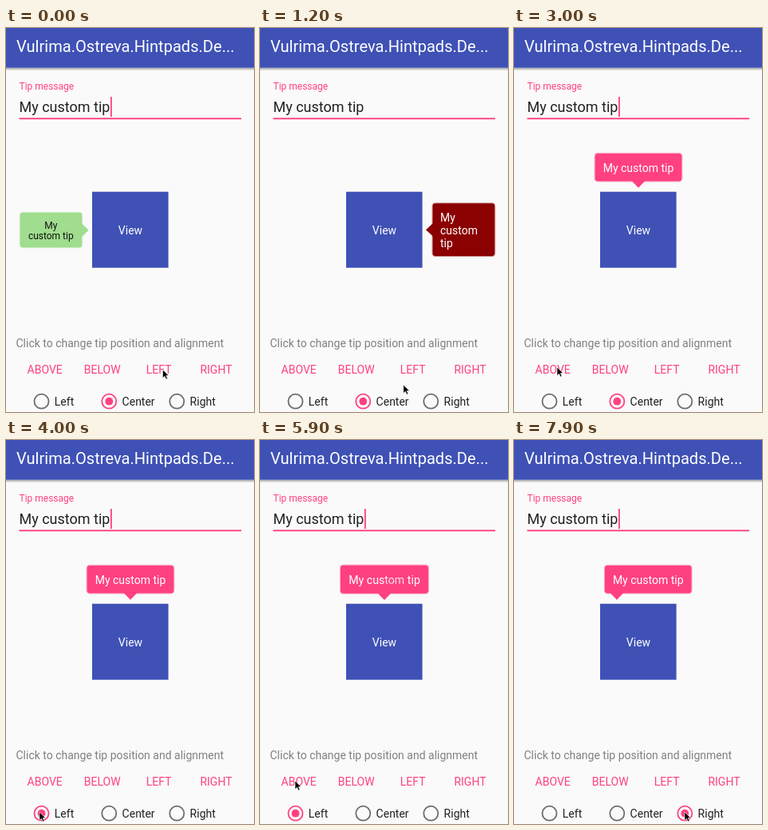
An HTML page for the animation above (8 s loop, 311 by 480 pixels).

```html
<!DOCTYPE html>
<html lang="en">
<head>
<meta charset="utf-8">
<title>Tooltip demo</title>
<style>
  html, body { margin: 0; width: 100%; height: 100%; overflow: hidden; background: #fafafa; }
  svg { display: block; width: 311px; height: 480px; font: 14px Roboto, "Noto Sans", sans-serif; }
  .pink { fill: #ff4081; }
  .blue { fill: #3f51b5; }
  .white { fill: #fff; }
  .ink { fill: #212121; }
  .mid { text-anchor: middle; }
</style>
</head>
<body>
<svg id="stage" viewBox="0 0 311 480">
  <linearGradient id="shade" x2="0" y2="1">
    <stop offset="0" stop-opacity=".36"/>
    <stop offset="1" stop-opacity="0"/>
  </linearGradient>
  <rect width="311" height="480" fill="#fafafa"/>
  <rect y="49.6" width="311" height="4" fill="url(#shade)"/>
  <rect class="blue" width="311" height="49.7"/>
  <text class="white" x="13" y="30" font-size="20.1">Vulrima.Ostreva.Hintpads.De...</text>

  <text class="pink" x="16.5" y="77" font-size="12">Tip message</text>
  <text class="ink" x="16.5" y="105" font-size="18">My custom tip</text>
  <rect class="pink" x="16.5" y="112.3" width="278.5" height="1.9"/>
  <rect id="caret" class="pink" x="131" y="86" width="1.8" height="25"/>

  <rect class="blue" x="108" y="204.7" width="95.6" height="95"/>
  <text class="white mid" x="156" y="257.5">View</text>

  <text x="12.5" y="399" fill="#808080">Click to change tip position and alignment</text>
  <g id="buttons" class="pink mid"></g>
  <g id="radios"></g>
  <g id="tips"></g>
  <path id="pointer" d="M0 0V10.4L2.5 8.2L4.2 12L6 11.2L4.3 7.5H7.5Z"
        fill="#000" stroke="#fff" stroke-width=".7" stroke-opacity=".8"/>
</svg>
<script>
const LOOP = 8000, STEP = 100, POP = 400, EDGE = 1.1;
const $ = id => document.getElementById(id);

function add(parent, tag, attrs, text) {
  const el = document.createElementNS("http://www.w3.org/2000/svg", tag);
  for (const k in attrs) el.setAttribute(k, attrs[k]);
  if (text) el.textContent = text;
  parent.appendChild(el);
  return el;
}

[["ABOVE", 48.7], ["BELOW", 120.7], ["LEFT", 191.7], ["RIGHT", 263.5]]
  .forEach(([label, x]) => add($("buttons"), "text", { x, y: 432 }, label));

// Radio buttons, selected during [from, to)
const radios = [
  { label: "Left", x: 44.5, from: 4000, to: 7900 },
  { label: "Center", x: 129.3, from: 0, to: 4000 },
  { label: "Right", x: 214.3, from: 7900, to: LOOP }
];
for (const r of radios) {
  const at = { cx: r.x, cy: 466.7 };
  r.ring = add($("radios"), "circle", { ...at, r: 9, fill: "none", "stroke-width": 1.8 });
  r.dot = add($("radios"), "circle", { ...at, r: 4.9, class: "pink" });
  add($("radios"), "text", { x: r.x + 16.3, y: 472, class: "ink" }, r.label);
}

// Tips: body box, arrow points, pivot, text lines, life span
const above = { color: "#ff4081", ink: "#fff", size: 14, y: 155.8, h: 36.8, w: 110.8 };
const tips = [
  { color: "#a0dd8e", ink: "#111", size: 12, x: 16.6, y: 229.7, w: 79.6, h: 45.6,
    arrow: "95,244.5 103.7,252.7 95,261", pivot: [60.3, 252.5],
    lines: [["My", 56.3, 250.5], ["custom tip", 56.3, 264.3]], show: -LOOP, hide: 633 },
  { color: "#8b0000", ink: "#fff", size: 14, x: 215.5, y: 218.2, w: 79.8, h: 67.8,
    arrow: "217,244 208,252.2 217,260.5", pivot: [251.5, 252],
    lines: [["My", 226, 241.7], ["custom", 226, 257.7], ["tip", 226, 273.7]],
    left: true, show: 633, hide: 2385 },
  { ...above, x: 100.6, arrow: "147.5,191 156,199.7 164.5,191", pivot: [156, 177.8],
    lines: [["My custom tip", 156, 179.5]], show: 2385, hide: 5880 },
  { ...above, x: 112.8, arrow: "120.5,191 129,199.7 137.5,191", pivot: [168.2, 177.8],
    lines: [["My custom tip", 168.2, 179.5]], show: 5880, hide: 2 * LOOP }
];
for (const t of tips) {
  t.el = add($("tips"), "g", {});
  // The translucent stroke gives the body a soft edge
  add(t.el, "rect", { x: t.x + EDGE, y: t.y + EDGE, width: t.w - 2 * EDGE,
    height: t.h - 2 * EDGE, rx: 3.4, fill: t.color, stroke: t.color,
    "stroke-opacity": .4, "stroke-width": 2 * EDGE });
  add(t.el, "polygon", { points: t.arrow, fill: t.color });
  for (const [s, x, y] of t.lines)
    add(t.el, "text", { x, y, fill: t.ink, "font-size": t.size,
      "text-anchor": t.left ? "start" : "middle" }, s);
}

const clamp = v => Math.max(0, Math.min(1, v));

function overshoot(p) {
  const q = p - 1;
  return q * q * (3 * q + 2) + 1;
}

function anticipateOvershoot(p) {
  const u = 2 * p, v = u - 2;
  return p < .5 ? .5 * u * u * (4 * u - 3) : .5 * (v * v * (4 * v + 3) + 2);
}

function tipScale(t, now) {
  if (now < t.show) return 0;
  if (now >= t.hide) return 1 - anticipateOvershoot(clamp((now - t.hide) / POP));
  return overshoot(clamp((now - t.show) / POP));
}

// Pointer stops: time, x, y
const path = [
  [0, 196.5, 427], [300, 222, 433], [650, 260, 425], [900, 260, 425],
  [1300, 165, 450], [1800, 25, 457], [2100, 25, 457], [2380, 46, 426],
  [2500, 46, 426], [2950, 54, 424], [3100, 54, 424], [3750, 42, 465],
  [4300, 42, 465], [5200, 37, 465], [5450, 18, 453], [5800, 44, 426],
  [6950, 44, 426], [7700, 214, 465], [LOOP, 214, 465]
];

function pointerAt(now) {
  const i = path.findIndex(p => p[0] > now);
  const a = path[i - 1], b = path[i];
  const p = (now - a[0]) / (b[0] - a[0]), e = p * p * (3 - 2 * p);
  return [a[1] + (b[1] - a[1]) * e, a[2] + (b[2] - a[2]) * e];
}

function draw(now) {
  const blink = now % 1000;
  $("caret").setAttribute("visibility", blink >= 150 && blink < 650 ? "hidden" : "visible");
  for (const t of tips) {
    const s = tipScale(t, now), [x, y] = t.pivot;
    t.el.setAttribute("opacity", clamp(s));
    t.el.setAttribute("transform", `translate(${x} ${y}) scale(${s}) translate(${-x} ${-y})`);
  }
  for (const r of radios) {
    const on = now >= r.from && now < r.to;
    r.ring.setAttribute("stroke", on ? "#ff4081" : "#6c6c6c");
    r.dot.setAttribute("opacity", on ? 1 : 0);
  }
  $("pointer").setAttribute("transform", `translate(${pointerAt(now)})`);
}

function tick() {
  const now = performance.now() % LOOP;
  draw(Math.floor(now / STEP) * STEP);
  requestAnimationFrame(tick);
}
tick();
</script>
</body>
</html>
```
